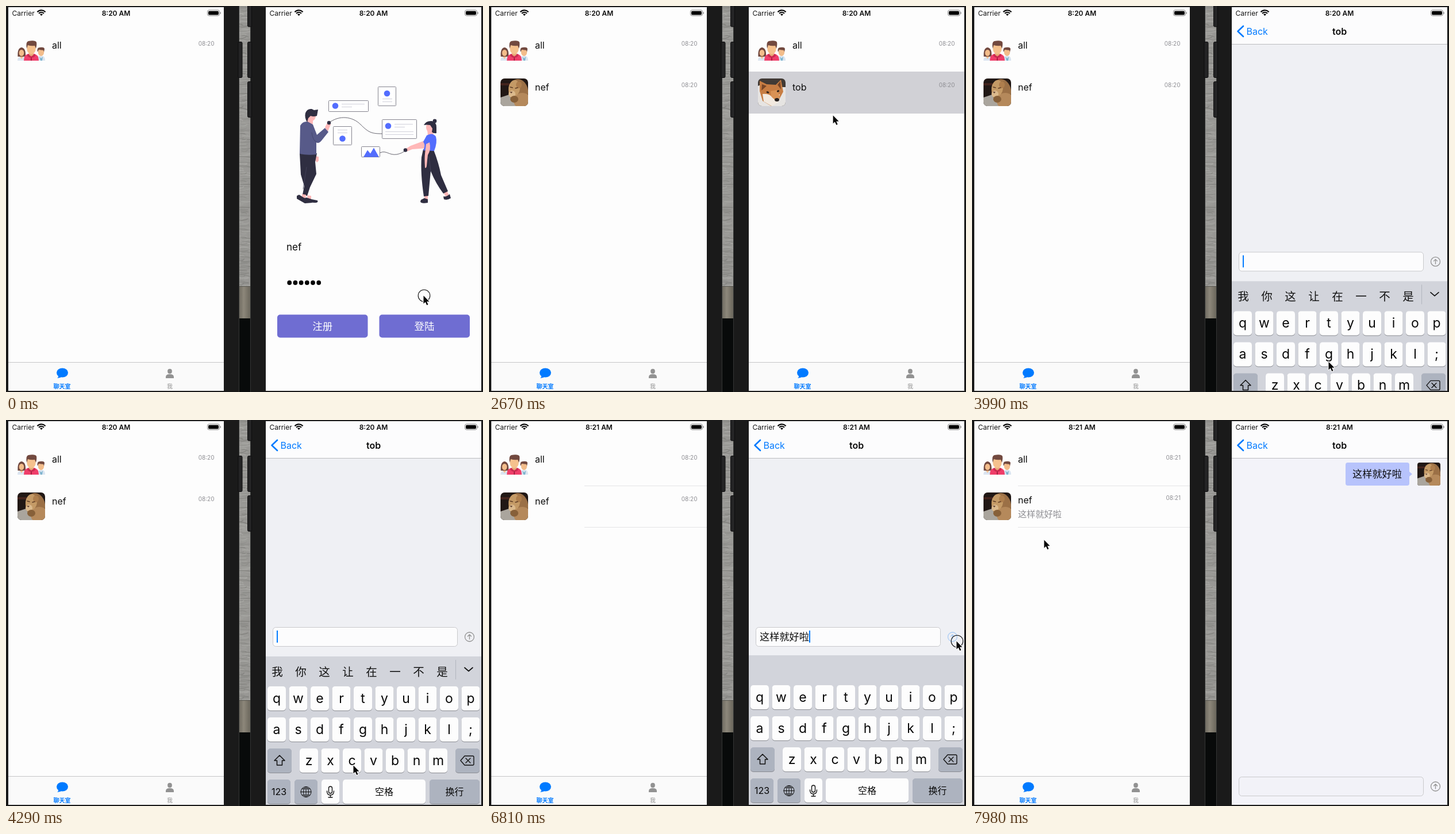
Recreate the animation shown at these times as an HTML page with a canvas. Size 830 by 671 pixels, loop 8000 ms.

```html
<!DOCTYPE html>
<html lang="zh">
<head>
<meta charset="utf-8">
<title>Chat demo</title>
<style>
html, body { margin: 0; width: 100%; height: 100%; overflow: hidden; background: #1a1a1a; }
canvas { display: block; width: 830px; height: 671px; }
</style>
</head>
<body>
<canvas id="stage"></canvas>
<script>
const W = 830, H = 671, LOOP = 8000, STEP = 147.9;
const canvas = document.getElementById('stage');
const c = canvas.getContext('2d');
const dpr = window.devicePixelRatio || 1;
canvas.width = W * dpr;
canvas.height = H * dpr;

const FONT = 'Inter, "Noto Sans CJK SC", "Noto Sans CJK", sans-serif';
const BLUE = '#007aff', INK = '#2f2e41', SKIN = '#ffb8b8', ACCENT = '#536dfe', GREY = '#8e8e93';
const USER = 'nef', FRIEND = 'tob', MESSAGE = '这样就好啦', PINYIN = 'zhe yang jiu hao la';

const clamp = v => Math.max(0, Math.min(1, v));
const ramp = (k, a, b) => clamp((k - a) / (b - a));
const smooth = p => p * p * (3 - 2 * p);
const easeOut = p => 1 - (1 - p) ** 3;

function rect(x, y, w, h, fill) { c.fillStyle = fill; c.fillRect(x, y, w, h); }

function round(x, y, w, h, r, fill, stroke, lw = 1) {
  c.beginPath();
  c.roundRect(x, y, w, h, r);
  if (fill) { c.fillStyle = fill; c.fill(); }
  if (stroke) { c.strokeStyle = stroke; c.lineWidth = lw; c.stroke(); }
}

function oval(x, y, rx, ry, fill, rot = 0) {
  c.beginPath();
  c.ellipse(x, y, rx, ry, rot, 0, 7);
  c.fillStyle = fill;
  c.fill();
}

function shape(d, fill, stroke, lw = 1) {
  const p = new Path2D(d);
  if (fill) { c.fillStyle = fill; c.fill(p); }
  if (stroke) {
    c.strokeStyle = stroke; c.lineWidth = lw;
    c.lineCap = c.lineJoin = 'round';
    c.stroke(p);
  }
}

function text(s, x, y, size, color = '#0c0c0c', align = 'left', weight = 400) {
  c.font = `${weight} ${size}px ${FONT}`;
  c.textAlign = align;
  c.fillStyle = color;
  c.fillText(s, x, y);
}

function at(x, y, draw) {
  c.save();
  c.translate(x, y);
  draw();
  c.restore();
}

function clip(x, y, w, h, r, draw) {
  c.save();
  c.beginPath();
  c.roundRect(x, y, w, h, r);
  c.clip();
  draw();
  c.restore();
}

// The strip of wood and the phone edges between both screens
function middle() {
  rect(0, 0, W, H, '#1a1a1a');
  let seed = 11;
  const rnd = () => (seed = seed * 16807 % 2147483647) / 2147483647;
  clip(406, 0, 19, H, 0, () => {
    rect(406, 0, 19, 487, '#999895');
    for (let y = -4; y < 490; y += 2) {
      const g = 118 + rnd() * 62 | 0, x = 402 + rnd() * 10, tilt = rnd() * 5 - 2.5;
      shape(`M${x} ${y}q7 ${-tilt} ${8 + rnd() * 14} ${tilt}`, null, `rgba(${g},${g},${g - 4},.75)`, 1.2);
    }
    const tan = c.createLinearGradient(406, 0, 425, 0);
    tan.addColorStop(0, '#706c62');
    tan.addColorStop(.4, '#8d877a');
    tan.addColorStop(1, '#6a665c');
    rect(406, 487, 19, 56, tan);
    rect(406, 487, 19, 1, '#55534c');
    rect(406, 543, 19, 128, '#080a0a');
  });
  rect(405, 0, 1, H, '#343635');
  rect(425, 0, 1, H, '#343635');
  const key = (x, y, h) => round(x, y, 7, h, 2, '#242425', '#0c0c0d');
  key(420.5, -4, 40);
  key(420.5, 62.5, 62);
  key(420.5, 131.5, 62);
  key(404, 62.5, 62);
}

function statusBar(clock) {
  text('Carrier', 10.5, 17, 12, '#151515');
  text(clock, 191.5, 17, 12, '#0c0c0c', 'center', 600);
  c.strokeStyle = '#0a0a0a';
  c.lineCap = 'butt';
  for (const [r, w] of [[9.6, 2.2], [6, 2.2], [1.7, 3.4]]) {
    c.beginPath();
    c.arc(61.5, 17, r, -Math.PI * .76, -Math.PI * .24);
    c.lineWidth = w;
    c.stroke();
  }
  round(350.5, 7, 21, 10, 3, null, '#8a8a8a');
  round(352, 8.7, 18, 6.8, 1.7, '#050505');
  round(372.5, 10.3, 1.3, 3.6, 1, '#8a8a8a');
}

function groupIcon() {
  shape('M20 95q0-7 6-7h4q5 0 5 7z', '#dbe5f1');
  shape('M20.5 88q-1-15 6.5-16 8 1 7 16z', '#72493f');
  oval(27, 81.5, 4.3, 5.5, '#f3bd8b');
  shape('M24 88l3 4 3-4z', '#f3bd8b');
  shape('M54 95q0-8 5-8h4q5 0 5 8z', '#dbe5f1');
  oval(61, 80, 5.2, 7, '#f3bd8b');
  shape('M55 80q-2-8 4-8 8-1 8 3l-1 5-1-3-8-1z', '#72493f');
  shape('M58 88l3 3 3-3-1 7h-3z', '#7fb5cf');
  shape('M31 95q0-11 9-12h8q9 1 9 12z', '#ef3e6a');
  round(40, 79, 8, 8, 3, '#e6a877');
  oval(44, 74, 7.7, 10, '#f5c18d');
  shape('M36 74q-2-12 3-13 12-2 14 2 1 4-1 11l-2-5q-7 1-12-1z', '#72493f');
  shape('M38 83l6 5 6-5 1 4-5 3-2-2-2 2-5-3z', '#c92b50');
  rect(43, 89, 2, 6, '#a92342');
}

function lion() {
  rect(0, 0, 48, 48, '#211815');
  rect(0, 8, 20, 4, '#42231c');
  shape('M0 33L18 27 28 48H0z', '#aaa59d');
  oval(31, 22, 17, 21, '#9b7046', -.15);
  oval(38, 39, 15, 14, '#b5895b');
  oval(24, 17, 10, 14, '#c49a66', .1);
  oval(32, 11, 5, 6, '#ae7e4d');
  oval(20, 27, 6, 6, '#dbb98c');
  oval(24, 36, 7, 6, '#876039');
  shape('M17 15l4 1M26 17l4-1', null, '#5b3a23', 1.4);
  shape('M16 23h5l-2 3z', '#6a4937');
}

function fox() {
  rect(0, 0, 48, 48, '#413a35');
  shape('M0 13q10-6 18 2h30v33H0z', '#e6e4e2');
  shape('M3 4l12 6 16 1 9-9 4 21-9 17-12 8-15-9-5-17z', '#c77d43');
  shape('M7 10l8 3-9 8zM34 11l5-6 1 14z', '#794627');
  shape('M8 27q12-2 18 7l12-7-3 15-11 6-14-8z', '#f2e9df');
  shape('M22 22l12-2 4 13-8 5-7-7z', '#d99255');
  oval(17, 24, 2.5, 1.5, '#2c211b', .3);
  oval(35, 22, 2.2, 1.5, '#2c211b', -.3);
  oval(33, 37, 4, 3, '#25201f');
}

function avatar(draw, x, y, size, r) {
  clip(x, y, size, size, r, () => at(x, y, () => {
    c.scale(size / 48, size / 48);
    draw();
  }));
}

function listPage(o) {
  rect(4, 2, 375, 667, '#fdfdfd');
  if (o.pressed) rect(4, 114, 375, 73, '#d1d1d6');
  if (o.rows) {
    const stamp = o.sent ? '08:21' : '08:20', up = o.sent ? 2 : 0, right = o.sent ? 363 : 362.5;
    groupIcon();
    text('all', 80, 74, 16);
    text(stamp, right, 69, 10, GREY, 'right');
    if (o.peer) {
      avatar(o.pic, 20, 126, 48, 7);
      text(o.peer, 80, 147 - up, 16);
      text(stamp, right, 141 - up, 10, GREY, 'right');
    }
    if (o.sent) text(MESSAGE, 80, 169, 15.2, GREY);
    if (o.lineX) for (const y of [114, 186]) rect(o.lineX, y, 379 - o.lineX, 1, '#e4e4e6');
  }
  rect(4, 619, 375, 50, '#fafafa');
  rect(4, 619, 375, 1, '#c6c6c8');
  oval(98, 637.5, 10, 8, BLUE);
  shape('M91 641q1 4-2 6 5 0 9-3z', BLUE);
  text('聊天室', 97.5, 665, 10, BLUE, 'center', 700);
  oval(285, 635, 3.9, 4.2, '#929292');
  shape('M278 647v-2q0-5 7-5t7 5v2z', '#929292');
  text('我', 285, 665, 10, '#929292', 'center', 500);
}

function card(x, y, w, h, dx, dy, lines) {
  round(x + .5, y + .5, w, h, 1, '#fff', '#85848f');
  if (dx) oval(x + dx, y + dy, 5.3, 5.3, ACCENT);
  for (const [lx, ly, lw] of lines) rect(x + lx, y + ly, lw, 1, '#d0d0da');
}

function man() {
  shape('M539 261l5 1v7l-3 3-4-5z', SKIN);
  shape('M511 256h30l-3 15 2 21-11 23-5 15-8-2 3-15-6-20z', INK);
  shape('M523 280l-6 38', null, '#46455c', .8);
  shape('M515 327l7 1-1 6-6-1zM524 329l7 1v6l-6-1z', SKIN);
  shape('M506 330l4-2 8 5 6 3 9 6-13 1-14-8z', INK);
  shape('M519 334l4-1 9 3 10 2q2 4-4 4l-20-1z', INK);
  shape('M555 211l4-8 3-1 3 4-5 12z', SKIN);
  shape('M523 196h11v9l-8 4z', SKIN);
  shape('M512 208q4-8 13-7l9 5 7 18 14-12 6 7-12 15q-5 6-9 3v21q-15 2-29-1z', '#575a89');
  shape('M532 220q2 15 9 17', null, '#44476f');
  oval(531.5, 191, 7.5, 9, SKIN);
  shape('M524 202q-5-8-3-16 3-8 11-7l4 2 7-1-2 11q-6 2-11 0l-4 4z', INK);
  oval(562, 203, 3.2, 3.2, INK);
}

function woman() {
  shape('M728 328l6 1v8h-6zM761 324l6-3 4 8-6 2z', SKIN);
  shape('M726 249l18 1q9 23 13 44l12 28-8 4q-13-17-22-39l-4 43-8 1q-6-40-4-68z', INK);
  shape('M736 262l3 25', null, '#4b4a60', .8);
  shape('M722 337l6-3 6 2v6q-12 2-13-2zM761 331q6 1 11-4l2 7q-6 4-12 2z', INK);
  shape('M731 233l-27 10-11 7 4 3 10-4 26-2z', SKIN);
  shape('M733 213l10-2 1 15h-10z', SKIN);
  shape('M732 225q10-6 16 2 3 10-3 25l-19-1q3-6 2-11l-2-4z', ACCENT);
  shape('M737 237q3 13-3 22-1 8-2 19-1 5-3 3-1-17 0-24 1-10 2-17z', SKIN);
  oval(738, 211, 7, 9, SKIN);
  oval(746, 200, 3.4, 3.4, INK);
  shape('M727 207q4-8 14-7 8 1 8 11v10q-5 1-8-2l1-6-4-6q-6-1-11 0z', INK);
  oval(695, 250.5, 3.3, 3.3, INK);
}

function loginPage(pressed) {
  rect(452, 2, 375, 667, '#fdfdfd');
  card(561, 164, 69, 19, 12, 9.5, [[23, 6, 40], [23, 11, 18]]);
  card(647, 140, 31, 33, 16, 12, [[8, 21, 17], [8, 26, 17]]);
  card(569, 209, 32, 32, 16.5, 21.5, [[8, 6, 17], [8, 11, 17]]);
  card(654, 197, 60, 33, 11, 11.5, [[22, 8, 32], [22, 13, 18], [6, 21, 49], [6, 26, 49]]);
  card(618, 244, 32, 18, 0, 0, []);
  shape('M622 262.5l7-12 5 6 6-10 9 16z', ACCENT);
  shape('M562 203C580 189 603 192 617 206S636 222 654 222M651 255C662 250 666 260 680 258Q690 256 695 251', null, '#55545f', .9);
  man();
  woman();
  text(USER, 488, 425, 17);
  for (let i = 0; i < 6; i++) oval(493.2 + i * 10.2, 481, 3.9, 3.9, '#050505');
  round(472, 536.5, 157.5, 40, 5, '#6f6dd2');
  text('注册', 550.7, 563, 17.5, '#fff', 'center');
  c.globalAlpha = pressed ? .5 : 1;
  round(649.5, 536.5, 157.5, 40, 5, '#6f6dd2');
  text('登陆', 728, 563, 17.5, '#fff', 'center');
  c.globalAlpha = 1;
}

function key(x, y, w, label, size = 23, dark = false) {
  round(x, y + 1, w, 42, 5, '#8b8d93');
  round(x, y, w, 42, 5, dark ? '#adb3bf' : '#fdfdfd');
  if (label) text(label, x + w / 2, y + (size > 20 ? 28.5 : 27), size, '#080808', 'center');
}

function suggestions(k) {
  if (k >= 40) return;
  if (k < 32) {
    [...'我你这让在一不是'].forEach((s, i) => text(s, 472 + i * 41, 445, 19.5, '#111', 'center'));
  } else {
    const n = Math.min(5, 1 + Math.floor((k - 32) * .65));
    let x = 463;
    for (const s of [MESSAGE.slice(0, n), '这样', '这', '着', '者']) {
      text(s, x, 445, 19.5, '#111');
      x += s.length * 19.5 + 21;
    }
  }
  rect(782, 417, 1, 34, '#b3b6be');
  shape('M798 430.5l7 6 7-6', null, '#111', 1.7);
}

function keyboard(k) {
  const shift = k >= 40 ? -2 : 0;
  rect(452, 411 + shift, 375, 262, '#d2d4db');
  suggestions(k);
  at(0, shift, () => {
    ['qwertyuiop', 'asdfghjkl;'].forEach((row, r) =>
      [...row].forEach((s, i) => key(455 + i * 37.5, 463 + r * 54, 32, s)));
    [...'zxcvbnm'].forEach((s, i) => key(511 + i * 37.5, 571, 32, s));
    key(455, 571, 42, '', 0, true);
    shape('M476 583l9 9h-4.5v8h-9v-8h-4.5z', null, '#111', 1.5);
    key(782, 571, 42, '', 0, true);
    shape('M791 592l7-8h14q2 0 2 2v12q0 2-2 2h-14zM800 588l8 8m0-8l-8 8', null, '#111', 1.4);
    key(455, 625, 40, '123', 16, true);
    key(502, 625, 40, '', 0, true);
    shape('M513 646.5a9 9 0 0 1 18 0a9 9 0 0 1-18 0zM517.5 646.5a4.5 9 0 0 1 9 0a4.5 9 0 0 1-9 0zM522 637.5v18M513 646.5h18M515 641h14M515 652h14', null, '#111', 1);
    key(549, 625, 31);
    round(561.5, 637, 6, 12, 3, null, '#111', 1.4);
    shape('M558.5 645q0 7 6 7t6-7M564.5 652v4M561 656h7', null, '#111', 1.4);
    key(586, 625, 144, '空格', 16);
    key(737, 625, 87, '换行', 16, true);
  });
}

function composer(k, y) {
  const typing = k >= 32 && k < 40, done = k >= 40 && k < 47;
  const color = k === 46 ? '#a9ccf5' : typing || done ? BLUE : '#929292';
  round(464.5, y + .5, 321, 33, 5, k >= 47 ? '#f2f2f8' : '#fcfcfd', '#c9c9cc');
  c.beginPath();
  c.arc(806.5, y + 17, 8, 0, 7);
  c.strokeStyle = color;
  c.lineWidth = 1.3;
  c.stroke();
  shape(`M806.5 ${y + 21}v-8m-3 3l3-3 3 3`, null, color, 1.3);
  const value = typing ? PINYIN.slice(0, Math.ceil((k - 31) / 8 * PINYIN.length)) : done ? MESSAGE : '';
  text(value, 471, y + 22.7, 17.2);
  if (k >= 26 && k < 47) {
    const width = value ? c.measureText(value).width : 0;
    if (typing) rect(471, y + 27, width, 1, '#777');
    rect(471 + width, y + 6, 2, 21, BLUE);
  }
}

function chatPage(k, p) {
  const lift = smooth(ramp(k, 25, 28)) * (1 - smooth(ramp(k, 47, 50)));
  at((1 - p) * 375, 0, () => {
    rect(452, 66, 375, 603, k >= 48 ? '#f3f3f9' : '#eff0f4');
    if (k >= 48) {
      round(650, 74, 111, 40, 4, '#b7c3fc');
      shape('M760 89l6 5-6 5z', '#b7c3fc');
      text(MESSAGE, 662, 100.3, 17.2);
      avatar(lion, 775, 74, 40, 4);
    }
    composer(k, 620 - 260 * lift);
    if (lift > 0) at(0, 260 * (1 - lift), () => keyboard(k));
  });
  c.globalAlpha = p;
  rect(452, 2, 375, 64, '#fcfcfd');
  rect(452, 66, 375, 1, '#bcbcc0');
  const dx = (1 - p) * 120;
  shape('M472 35l-9.5 9 9.5 9', null, BLUE, 2.6);
  text('Back', 477.5 + dx * .5, 50, 16, BLUE);
  text(FRIEND, 639.5 + dx, 50, 16, '#080808', 'center', 600);
  c.globalAlpha = 1;
}

// step, x, y of the pointer
const PATH = [
  [0, 726, 503], [1, 722, 556], [5, 722, 556], [8, 563, 349], [9, 563, 349],
  [17, 594, 157], [23, 650, 600], [25, 640, 632], [27, 620, 618], [29, 604, 600],
  [31, 604, 466], [39, 745, 425], [45, 813, 384], [47, 813, 384], [54, 125, 208]
];

function pointer(k) {
  if (k > 18 && k < 24 || k > 31 && k < 40) return;
  let i = 0;
  while (i < PATH.length - 2 && k > PATH[i + 1][0]) i++;
  const [ka, xa, ya] = PATH[i], [kb, xb, yb] = PATH[i + 1];
  const p = smooth(ramp(k, ka, kb));
  at(xa + (xb - xa) * p, ya + (yb - ya) * p, () => {
    if (k < 2 || k === 46) {
      c.beginPath();
      c.arc(1.5, .5, 10.3, 0, 7);
      c.strokeStyle = '#111';
      c.lineWidth = 1.1;
      c.stroke();
    }
    const d = 'M.5 .5v14l3.2-3 2.5 5.5 2.3-1-2.4-5.3h4.4z';
    shape(d, null, '#fff', 2.2);
    shape(d, '#050505');
  });
}

function draw(k) {
  const clock = k >= 36 ? '8:21 AM' : '8:20 AM';
  const rows = k >= 10, sent = k >= 47;
  c.setTransform(dpr, 0, 0, dpr, 0, 0);
  middle();
  clip(4, 2, 375, 667, 0, () => {
    listPage({ rows: true, peer: rows && USER, pic: lion, sent, lineX: sent ? 80 : k >= 36 ? 166 : 0 });
    statusBar(clock);
  });
  clip(452, 2, 375, 667, 0, () => {
    const push = easeOut(ramp(k, 18, 22));
    if (push < 1) {
      at(448 - push * 112, 0, () => listPage({ rows, peer: FRIEND, pic: fox, pressed: k >= 18 }));
    }
    if (k < 4) at(0, 671 * smooth(ramp(k, 1, 4)), () => loginPage(k >= 1));
    if (push > 0) chatPage(k, push);
    at(448, 0, () => statusBar(clock));
  });
  pointer(k);
}

const begin = performance.now();
let shown = -1;
function tick() {
  const t = (performance.now() - begin) % LOOP;
  const k = Math.floor((t + 8) / STEP);
  if (k !== shown) draw(shown = k);
  requestAnimationFrame(tick);
}
tick();
</script>
</body>
</html>
```
